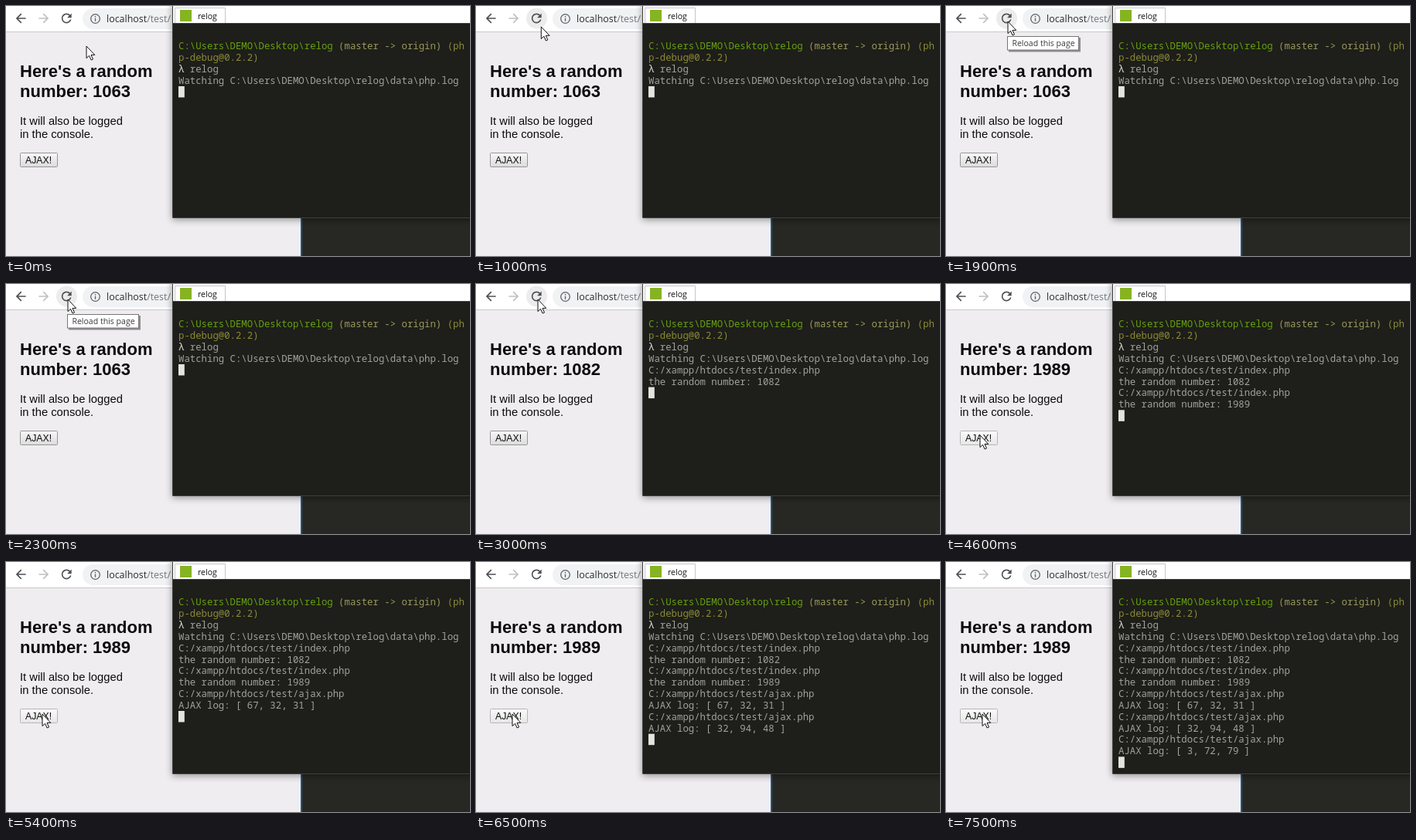
Write an HTML page that moves like this. It is 600 px wide and 324 px high and loops after 7600 ms.

```html
<!DOCTYPE html>
<html lang="en">
<head>
<meta charset="utf-8">
<title>Live log demo</title>
<style>
  html, body { margin: 0; width: 100%; height: 100%; overflow: hidden; background: #efedf0; }
  svg { display: block; width: 600px; height: 324px; }
  text { white-space: pre; }
  .ui { font-family: "Open Sans", sans-serif; }
  .page { font-family: "Liberation Sans", Arial, sans-serif; fill: #0c0c0c; }
  .mono { font: 12.33px "Noto Sans Mono", monospace; fill: #a3a39d; }
  .shadow { filter: drop-shadow(0 2px 5px rgba(0, 0, 0, .4)); }
</style>
</head>
<body>
<svg viewBox="0 0 600 324">
  <defs>
    <linearGradient id="face" x2="0" y2="1">
      <stop stop-color="#f7f7f7"/><stop offset="1" stop-color="#dcdcdc"/>
    </linearGradient>
    <path id="arrow" d="M20 11H7.83l5.59-5.59L12 4l-8 8 8 8 1.41-1.41L7.83 13H20z"/>
  </defs>

  <!-- Browser -->
  <rect width="382" height="324" fill="#efedf0"/>
  <rect width="382" height="33" fill="#fff"/>
  <rect y="33" width="382" height="1" fill="#c9c9cb"/>
  <circle id="hover" cx="78.5" cy="16" r="13.5" fill="#ececed"/>
  <use href="#arrow" transform="translate(9.6 6.4) scale(.8)" fill="#4d5054"/>
  <use href="#arrow" transform="translate(58.4 6.4) scale(-.8 .8)" fill="#bfc0c2"/>
  <path transform="translate(68.7 6.4) scale(.8)" fill="#4d5054" d="M17.65 6.35C16.2 4.9 14.21 4 12 4c-4.42 0-8 3.58-8 8s3.58 8 8 8c3.73 0 6.84-2.55 7.73-6h-2.08c-.82 2.33-3.04 4-5.65 4-3.31 0-6-2.69-6-6s2.69-6 6-6c1.66 0 3.14.69 4.22 1.78L13 11h7V4z"/>
  <rect x="99" y="3" width="200" height="27" rx="13.5" fill="#f1f2f4"/>
  <circle cx="115.5" cy="16.5" r="5.8" fill="none" stroke="#5f6368" stroke-width="1.3"/>
  <path d="M115.5 13v1.5M115.5 15.7v4" stroke="#5f6368" stroke-width="1.4"/>
  <text class="ui" x="130" y="21" font-size="12.45" fill="#2b2c2f">localhost<tspan fill="#74777b">/test/</tspan></text>

  <g class="page">
    <g font-size="22" font-weight="bold">
      <text x="18" y="91.6">Here's a random</text>
      <text id="number" x="18" y="117.6"></text>
    </g>
    <g font-size="14.75">
      <text x="18" y="154">It will also be logged</text>
      <text x="18" y="171">in the console.</text>
    </g>
    <rect x="18.5" y="190.5" width="48" height="18" rx="1" fill="url(#face)" stroke="#969696"/>
    <rect id="glow" x="18" y="190" width="49" height="19" rx="1" fill="#fff" opacity=".3"/>
    <text x="25" y="203.7" font-size="12.26">AJAX!</text>
  </g>

  <!-- Editor behind the terminal -->
  <rect x="382" y="260" width="218" height="64" fill="#272823"/>
  <rect x="381" y="260" width="2" height="64" fill="#1d5688"/>

  <!-- Terminal -->
  <g class="shadow">
    <rect x="215" y="-10" width="400" height="285" fill="#fff"/>
  </g>
  <rect x="216" y="22" width="384" height="252" fill="#1e1e1a"/>
  <path d="M215.5 0V274.5H600M216 22.5H600" fill="none" stroke="#3f3f3d"/>
  <path d="M218.5 22V2.5H283.5V22" fill="#fff" stroke="#c6c6c6"/>
  <rect x="225" y="5" width="15" height="15" fill="#86b322"/>
  <text class="ui" x="248" y="17" font-size="10.55" fill="#111">relog</text>
  <g id="terminal" class="mono"></g>
  <rect id="caret" x="223" width="7.8" height="14.5" fill="#e4e4df"/>

  <g id="tooltip">
    <rect x="81" y="41" width="93" height="18.5" fill="#000" opacity=".4"/>
    <rect x="79.5" y="39.5" width="92" height="17.5" fill="#fff" stroke="#777"/>
    <text class="ui" x="85.4" y="51.8" font-size="10.55" fill="#3c3c3c">Reload this page</text>
  </g>
  <path id="pointer" d="M0 0V15.6L3.6 12.3 6.1 18 8.5 17 6 11.4H10.8Z" fill="#fff" stroke="#111"/>
</svg>

<script>
const LOOP = 7600, STEP = 100;
const FIRST_LINE = 52, LINE_HEIGHT = 14.84;
const $ = id => document.getElementById(id);

// Each output line: time of appearance, then text / colour runs.
const lines = [
  [0, ["C:\\Users\\DEMO\\Desktop\\relog", "#66a010"], [" (master -> origin)", "#9a9a5c"], [" (ph", "#8b8b36"]],
  [0, ["p-debug@0.2.2)", "#8b8b36"]],
  [0, ["λ", "#e0e0d8"], [" relog"]],
  [0, ["Watching C:\\Users\\DEMO\\Desktop\\relog\\data\\php.log"]],
  ...[
    [2900, "index", "the random number: 1082"],
    [3600, "index", "the random number: 1989"],
    [4800, "ajax", "AJAX log: [ 67, 32, 31 ]"],
    [5900, "ajax", "AJAX log: [ 32, 94, 48 ]"],
    [6900, "ajax", "AJAX log: [ 3, 72, 79 ]"],
  ].flatMap(([time, file, message]) => [
    [time, [`C:/xampp/htdocs/test/${file}.php`]],
    [time, [message]],
  ]),
];

// Pointer stops: time, x, y
const stops = [
  [0, 104, 52], [600, 104, 52], [1100, 82, 24], [1300, 82, 24], [1600, 80, 20],
  [3700, 80, 20], [4200, 45, 206], [4400, 44, 196], [4600, 44, 196],
  [4700, 47, 197], [LOOP, 47, 197],
];

const rows = lines.map(([time, ...runs], i) => {
  const row = document.createElementNS("http://www.w3.org/2000/svg", "text");
  row.setAttribute("x", 223);
  row.setAttribute("y", FIRST_LINE + 4.3 + i * LINE_HEIGHT);
  for (const [text, colour] of runs) {
    const run = document.createElementNS(row.namespaceURI, "tspan");
    run.textContent = text;
    if (colour) run.style.fill = colour;
    row.append(run);
  }
  $("terminal").append(row);
  return { row, time };
});

function pointerAt(time) {
  const next = stops.findIndex(stop => stop[0] > time);
  const [t0, x0, y0] = stops[next - 1], [t1, x1, y1] = stops[next];
  const p = (time - t0) / (t1 - t0), eased = p * p * (3 - 2 * p);
  return [x0 + (x1 - x0) * eased, y0 + (y1 - y0) * eased];
}

const show = (element, visible) => element.style.display = visible ? "" : "none";

function draw(now) {
  const time = Math.floor(now % LOOP / STEP) * STEP;
  const [x, y] = pointerAt(time);
  $("pointer").setAttribute("transform", `translate(${x} ${y})`);
  show($("hover"), Math.hypot(x - 78.5, y - 16) < 13.5);
  show($("glow"), x > 18 && x < 67 && y > 190 && y < 209);
  show($("tooltip"), time >= 1900 && time < 2500);
  $("number").textContent = "number: " + (time < 2900 ? 1063 : time < 3600 ? 1082 : 1989);

  let count = 0;
  for (const { row, time: start } of rows) {
    show(row, time >= start);
    if (time >= start) count++;
  }
  $("caret").setAttribute("y", FIRST_LINE - 7.4 + count * LINE_HEIGHT);
  requestAnimationFrame(draw);
}
draw(performance.now());
</script>
</body>
</html>
```
